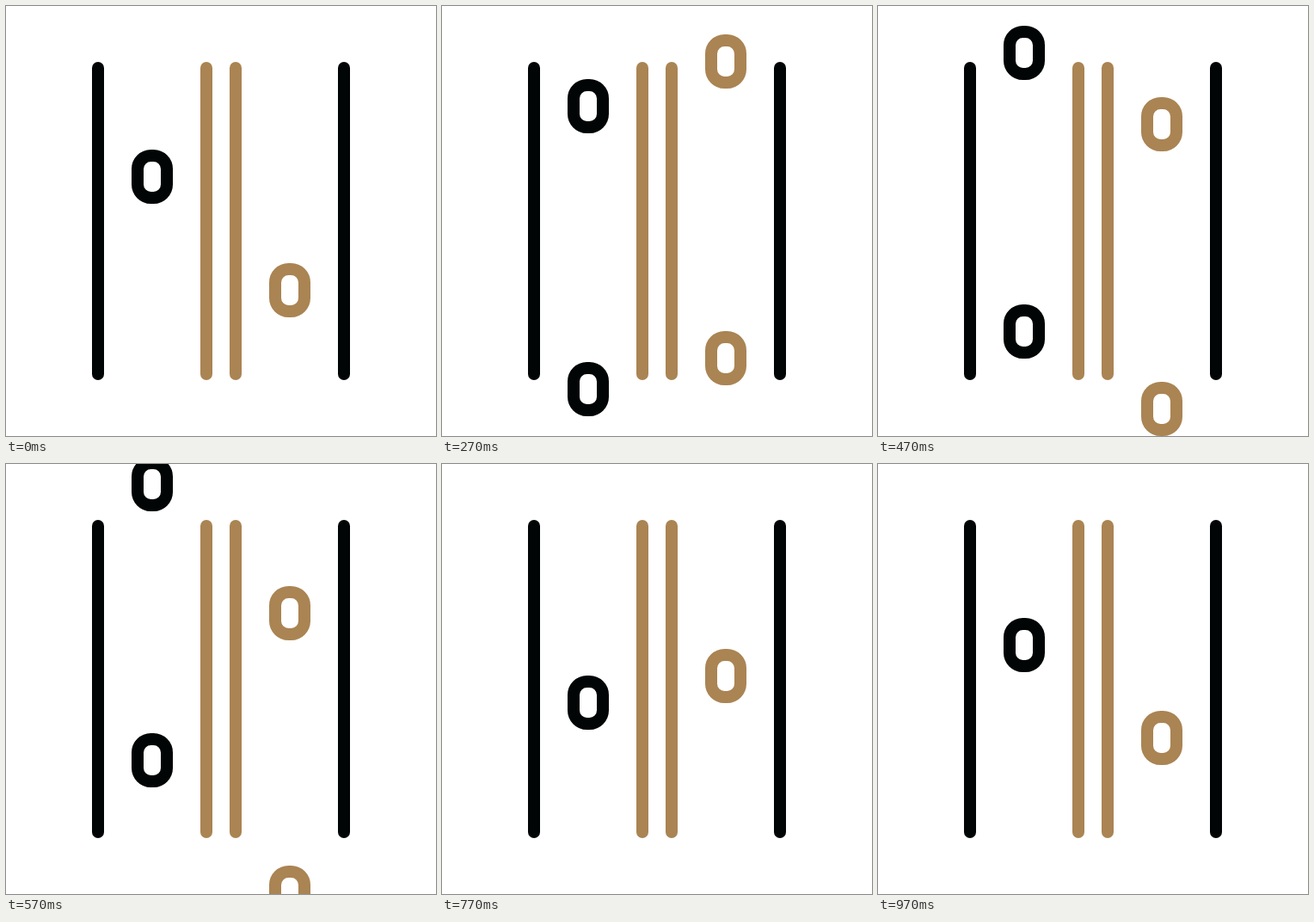
These frames come from a looping animation (500 px wide and 500 px high, 1 s). An HTML page with a canvas:

```html
<!DOCTYPE html>
<html lang="en">
<head>
<meta charset="utf-8">
<title>Lines and rings</title>
<style>
  html, body { margin: 0; width: 100%; height: 100%; overflow: hidden; background: #fff; }
  canvas { display: block; }
</style>
</head>
<body>
<canvas id="stage" width="500" height="500"></canvas>
<script>
  const ctx = document.getElementById('stage').getContext('2d');
  const BLACK = '#010505';
  const GOLD = '#aa8453';
  const LOOP = 1000;

  const bars = [[107, BLACK], [233, GOLD], [267, GOLD], [393, BLACK]];

  // Top edge at the loop start and distance moved per step.
  const rings = [
    { x: 146, top: 167.3, speed: -10.3, color: BLACK },
    { x: 146, top: 502.9, speed: -11.17, color: BLACK },
    { x: 306, top: 299.3, speed: 9.87, color: GOLD },
    { x: 306, top: -63.8, speed: 12.1, color: GOLD }
  ];

  function drawBar(x, color) {
    ctx.strokeStyle = color;
    ctx.beginPath();
    ctx.moveTo(x, 72);
    ctx.lineTo(x, 428);
    ctx.stroke();
  }

  function drawRing(x, y, color) {
    ctx.strokeStyle = color;
    ctx.beginPath();
    ctx.roundRect(x + 7, y + 7, 34, 49, 15.5);
    ctx.stroke();
  }

  // 30 steps per loop, with start times rounded to 10 ms.
  function stepAt(ms) {
    return Math.floor((Math.floor(ms / 10) + 0.4) * 0.3);
  }

  function draw(now) {
    const step = stepAt(now % LOOP);
    ctx.fillStyle = '#fff';
    ctx.fillRect(0, 0, 500, 500);
    ctx.lineWidth = 14;
    ctx.lineCap = 'round';
    for (const [x, color] of bars) drawBar(x, color);
    for (const r of rings) drawRing(r.x, Math.round(r.top + r.speed * step), r.color);
  }

  const start = performance.now();
  function tick() {
    draw(performance.now() - start);
    requestAnimationFrame(tick);
  }
  tick();
</script>
</body>
</html>
```
